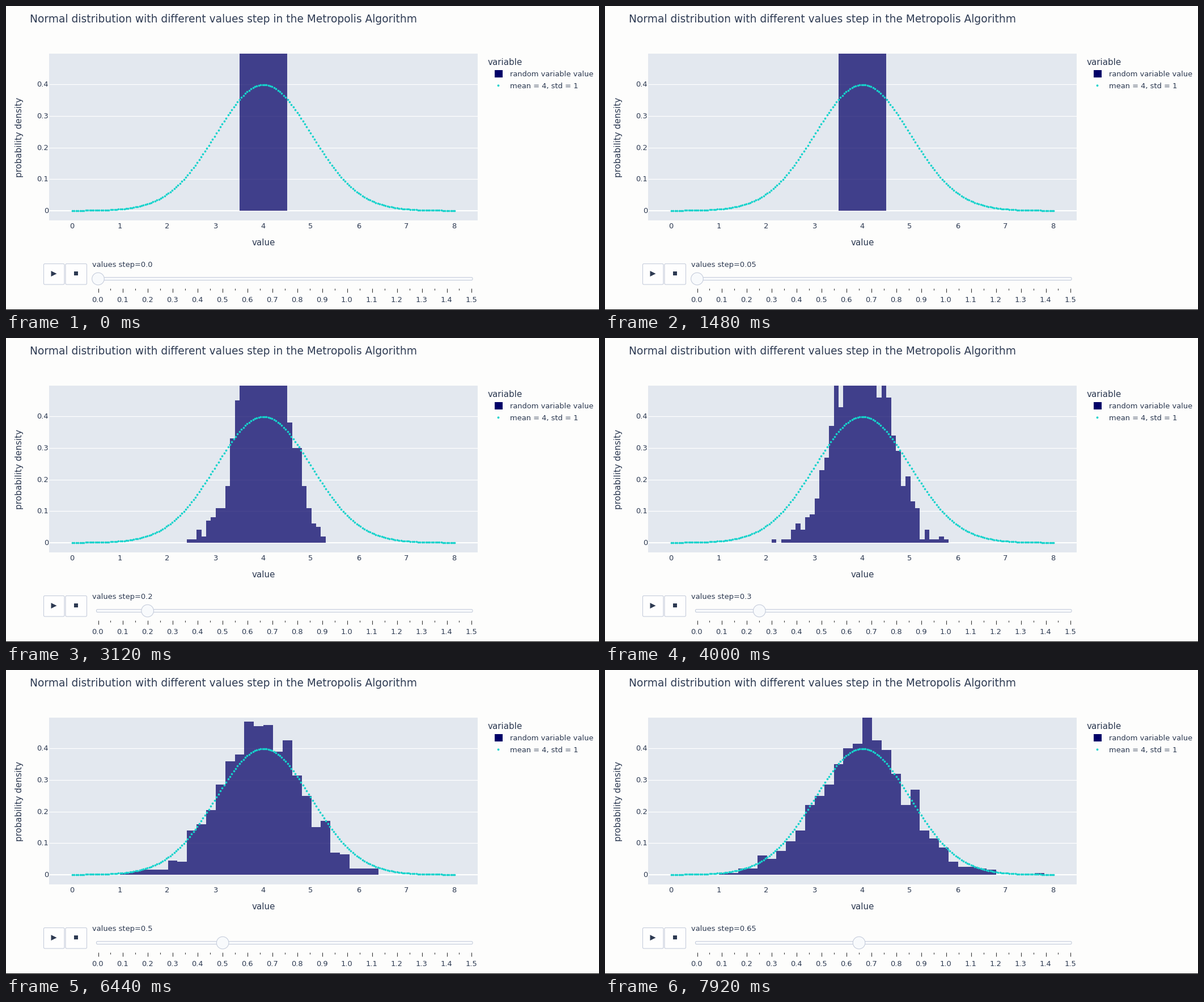
A matplotlib script that plays this animation: 1046 by 536 pixels, repeating every 8 s.

```python
import numpy as np
import matplotlib.pyplot as plt
from matplotlib.animation import FuncAnimation
from matplotlib.collections import LineCollection
from matplotlib.patches import Circle, FancyBboxPatch, Polygon, Rectangle

W, H, DPI = 1046, 536, 100
PT = 72 / DPI                       # points per pixel
INTERVAL, LOOP = 40, 8000

INK = "#2d3a52"
PAPER = "#fdfdfc"
PANEL = "#e3e8ef"
BORDER = "#c6cddc"
NAVY = "#000068"
BAR = "#0a076a"
CYAN = "#16d3cc"

LEFT, RIGHT, TOP, BOTTOM = 76, 832, 84, 378
SAMPLES = 1000
STEP = 0.05

# Playback: the label changes first, the redraw follows a little later.
START, PERIOD, LAG, SLIDE = 1410, 510, 100, 100
STEPS = (LOOP - START) // PERIOD + 2

plt.rcParams["font.family"] = "DejaVu Sans"
fig = plt.figure(figsize=(W / DPI, H / DPI), dpi=DPI, facecolor=PAPER)
ax = fig.add_axes([0, 0, 1, 1])
ax.set_xlim(0, W)
ax.set_ylim(H, 0)
ax.axis("off")


def px(value):
    return 117 + 84.3 * np.asarray(value)


def py(density):
    return 360.7 - 556 * np.asarray(density)


def slider_x(value):
    return 162.5 + 439.3 * value


def label(x, y, text, size=13, ha="left", **kw):
    return ax.text(x, y, text, fontsize=size * PT, color=INK, ha=ha,
                   va="baseline", **kw)


def box(x0, y0, x1, y1, fill):
    ax.add_patch(FancyBboxPatch(
        (x0, y0), x1 - x0, y1 - y0,
        boxstyle="round,pad=0,rounding_size=2",
        fc=fill, ec=BORDER, lw=1.1 * PT, zorder=3))


def lines(segments, color, width, z):
    ax.add_collection(LineCollection(segments, colors=color,
                                     linewidths=width * PT, zorder=z))


def draw_chart():
    ax.add_patch(Rectangle((LEFT, TOP), RIGHT - LEFT, BOTTOM - TOP,
                           fc=PANEL, lw=0, zorder=1))
    for k in range(5):
        y = py(k / 10)
        lines([[(LEFT, y), (RIGHT, y)]], "white", 1.2 if k else 2.1, 2)
        label(75, y + 4.2, f"{k / 10:g}", ha="right")
    for v in range(9):
        label(px(v) - 1, 392, str(v), ha="center")

    v = np.linspace(0, 8, 200)
    bell = np.exp(-(v - 4) ** 2 / 2) / np.sqrt(2 * np.pi)
    ax.plot(px(v), py(bell), "o", ms=3.7 * PT, mew=0, color=CYAN,
            zorder=6, snap=False)

    label(41.8, 29.2, "Normal distribution with different values step "
          "in the Metropolis Algorithm", 18.6)
    label(454, 421.5, "value", 15.17, "center")
    label(28, 231, "probability density", 15.17, "center", rotation=90,
          rotation_mode="anchor")


def draw_legend():
    label(849.5, 103.8, "variable", 15.17)
    ax.add_patch(Rectangle((862, 113), 14, 13, fc=NAVY, lw=0))
    label(889, 124.2, "random variable value")
    ax.add_patch(Circle((868.5, 140.3), 1.9, fc=CYAN, lw=0))
    label(889, 144.8, "mean = 4, std = 1")


def draw_controls():
    box(66.5, 454.5, 103, 491, "#fefefe")
    box(105, 454.5, 142.5, 491, "#fefefe")
    ax.add_patch(Polygon([(79.5, 467), (89.5, 472), (79.5, 477)],
                         fc=INK, lw=0, zorder=4))
    ax.add_patch(Rectangle((120, 468), 7, 7, fc=INK, lw=0, zorder=4))

    box(159.5, 478.5, 823, 483.5, "#f8fafc")
    for k in range(31):
        x = slider_x(k * STEP)
        lines([[(x, 497.5), (x, 501 if k % 2 else 504.5)]], "#333333", 1.1, 3)
        if k % 2 == 0:
            label(x - 0.7, 521.5, f"{k * STEP:.1f}", ha="center")
    ax.add_patch(Rectangle((0, 535), W, 1, fc="black", lw=0,
                           antialiased=False))


def outline(k):
    """Stepped histogram outline for step k, cut at the panel top.

    Larger steps explore more of the bell, so the spread grows towards 1.
    """
    spread = np.tanh(2.5 * k * STEP)
    if k:
        sizes = np.array([0.02, 0.05, 0.1, 0.2])
        width = sizes[np.abs(np.log(sizes / (spread / 5))).argmin()]
        half = round(4 / width)
    else:
        width, half = 1, 0.5
    edges = 4 + width * np.arange(-half, half + 1)
    values = np.random.default_rng(k).normal(4, spread, SAMPLES)
    counts, _ = np.histogram(values, edges)
    tops = np.maximum(py(counts / (SAMPLES * width)), TOP)
    ys = np.concatenate([[py(0)], np.repeat(tops, 2), [py(0)]])
    return np.column_stack([np.repeat(px(edges), 2), ys])


outlines = [outline(k) for k in range(STEPS)]

draw_chart()
draw_legend()
draw_controls()
bars = ax.add_patch(Polygon(outlines[0], fc=BAR, alpha=0.75, lw=0, zorder=4,
                            antialiased=False))
grip = ax.add_patch(Circle((slider_x(0), 481), 10.8, fc="#f8fafc", ec=BORDER,
                           lw=1.1 * PT, zorder=5))
caption = label(151.6, 460.2, "")


def step_at(t):
    return max(0, (t - START) // PERIOD + 1)


def ease(u):
    u = min(max(u, 0), 1)
    return 4 * u ** 3 if u < 0.5 else 1 - 4 * (1 - u) ** 3


def update(frame):
    t = frame * INTERVAL
    caption.set_text(f"values step={round(step_at(t) * STEP, 2)}")

    shown = step_at(t - LAG)
    bars.set_xy(outlines[shown])
    position = 0
    if shown:
        since = t - LAG - START - (shown - 1) * PERIOD
        position = shown - 1 + ease(since / SLIDE)
    grip.center = slider_x(position * STEP), 481
    return bars, grip, caption


anim = FuncAnimation(fig, update, frames=LOOP // INTERVAL, interval=INTERVAL,
                     init_func=lambda: update(0), repeat=True, repeat_delay=0)
plt.show()
```
